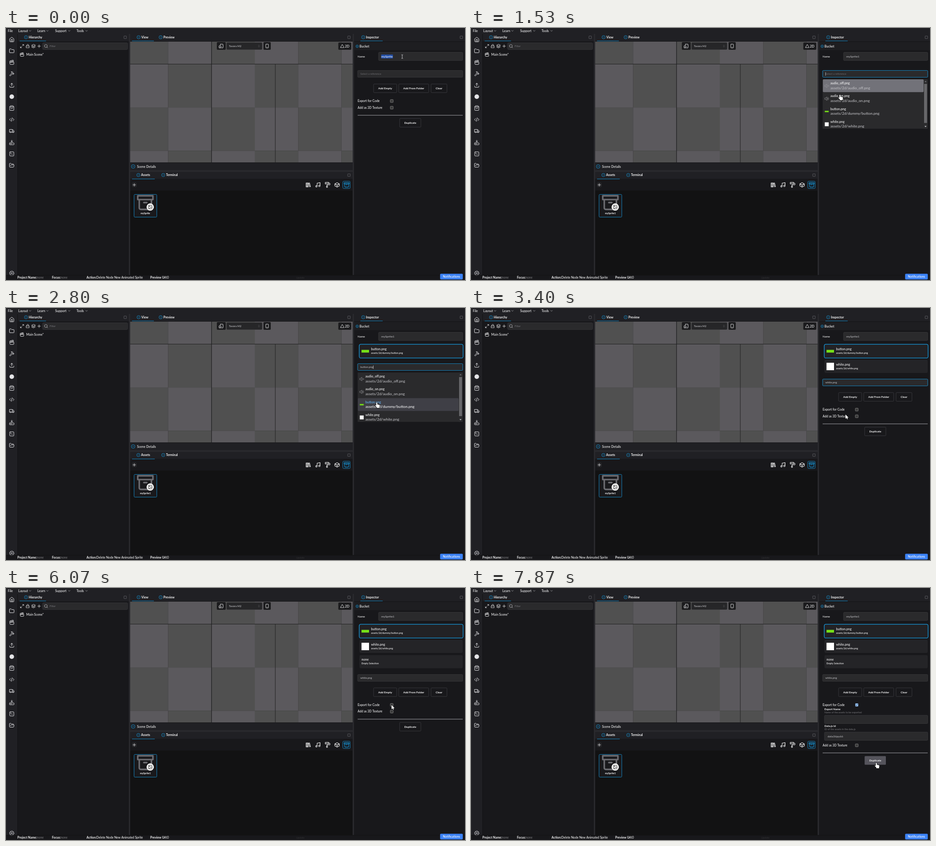
An HTML page with a canvas for the animation above (8000 ms loop, 1009 by 555 pixels).

```html
<!DOCTYPE html>
<html lang="en">
<head>
<meta charset="utf-8">
<title>Asset bucket editor</title>
<style>
  html, body { margin: 0; width: 100%; height: 100%; overflow: hidden; background: #18181b; }
  canvas { display: block; }
</style>
</head>
<body>
<canvas id="stage" width="1009" height="555"></canvas>
<script>
const ctx = document.getElementById('stage').getContext('2d');
const LOOP = 8000, BLUE = '#169be0', EDGE = '#1580b8', WHITE = '#f7f7f8';
const PANEL = '#18181b', BAR = '#202024', FIELD = '#2a2a2c', GAP = '#29292d';

// Icons live on a 24 x 24 grid.
const ring = (x, y, r) => `M${x - r} ${y}a${r} ${r} 0 1 0 ${2 * r} 0a${r} ${r} 0 1 0 ${-2 * r} 0`;
const gear = Array.from({ length: 32 }, (_, i) => {
  const a = i * Math.PI / 16, r = i % 4 < 2 ? 10.5 : 8;
  return (i ? 'L' : 'M') + (12 + r * Math.cos(a)) + ' ' + (12 + r * Math.sin(a));
}).join('') + 'z' + ring(12, 12, 3);
const SQUARE = 'M5 3h14a2 2 0 0 1 2 2v14a2 2 0 0 1-2 2H5a2 2 0 0 1-2-2V5a2 2 0 0 1 2-2z';
const SPEAKER = 'M12 3 7 8H2v8h5l5 5z';
const ICONS = {
  home: 'M3 9l9-7 9 7v11a2 2 0 0 1-2 2H5a2 2 0 0 1-2-2zM9 22V12h6v10',
  folder: 'M4 20h16a2 2 0 0 0 2-2V8a2 2 0 0 0-2-2h-8l-3-3H4a2 2 0 0 0-2 2v13a2 2 0 0 0 2 2z',
  clapper: 'M4 11h17v8a2 2 0 0 1-2 2H6a2 2 0 0 1-2-2zM4 11 3 8a2 2 0 0 1 1.5-2.4L18 2l1.5 4.5zM7.5 5l4 4M13 3.5l4 4',
  hammer: 'M15 12l-8.5 8.5a2 2 0 0 1-3-3L12 9M17.6 15 22 10.6M20.9 11.7l-3.3-3.3V6L14 3H9l4 4v2l3 3h2z',
  upload: 'M21 15v4a2 2 0 0 1-2 2H5a2 2 0 0 1-2-2v-4M7 8l5-5 5 5M12 3v12',
  bag: 'M6 2 3 6v14a2 2 0 0 0 2 2h14a2 2 0 0 0 2-2V6l-3-4zM3 6h18M16 10a4 4 0 0 1-8 0',
  code: 'M7 17l-5-5 5-5M17 7l5 5-5 5M14 4l-4 16',
  truck: 'M10 17h5V5H2v12h3M20 17h2v-5l-3-4h-4' + ring(7.5, 17, 2.5) + ring(17.5, 17, 2.5),
  drive: 'M12 2v8M16 6l-4 4-4-4M4 14h16a2 2 0 0 1 2 2v4a2 2 0 0 1-2 2H4a2 2 0 0 1-2-2v-4a2 2 0 0 1 2-2zM6 18h1M10 18h1',
  terminal: SQUARE + 'M7 11l2-2-2-2M11 13h4',
  folderOpen: 'M6 14l1.5-3A2 2 0 0 1 9.2 10H20a2 2 0 0 1 2 2.5l-1.5 6A2 2 0 0 1 18.5 20H4a2 2 0 0 1-2-2V5a2 2 0 0 1 2-2h4l3 3h7a2 2 0 0 1 2 2v2',
  gear,
  expand: 'M15 3h6v6M9 21H3v-6M21 3l-7 7M3 21l7-7',
  lock: 'M4 11h16v10H4zM7 11V7a5 5 0 0 1 10 0v4',
  layers: 'M12 2 2 7l10 5 10-5zM2 12l10 5 10-5M2 17l10 5 10-5',
  plus: 'M12 4v16M4 12h16',
  search: ring(11, 11, 8) + 'M21 21l-4.3-4.3',
  books: 'M3 4h4v16H3zM8 4h4v16H8zM13.5 5l3.5-1 4 15-3.5 1z',
  music: 'M9 18V5l12-2v13' + ring(6, 18, 3) + ring(18, 16, 3),
  roller: 'M3 2h14v6H3zM10 16v-2a2 2 0 0 1 2-2h8a2 2 0 0 0 2-2V7a2 2 0 0 0-2-2h-2M8 16h4v6H8z',
  box: 'M21 16V8l-9-5-9 5v8l9 5zM3 8l9 5 9-5M12 13v8',
  archive: 'M2 3h20v5H2zM4 8v11a2 2 0 0 0 2 2h12a2 2 0 0 0 2-2V8M10 12h4',
  image: SQUARE + ring(9, 9, 2) + 'M21 15l-4-4L6 21',
  phone: 'M7 2h10a2 2 0 0 1 2 2v16a2 2 0 0 1-2 2H7a2 2 0 0 1-2-2V4a2 2 0 0 1 2-2zM12 18h.1',
  devices: 'M9 3h10a2 2 0 0 1 2 2v14a2 2 0 0 1-2 2h-5M3 11h8v10H3zM8 7V3M7 18h.1',
  triangle: 'M12 3 2 20h20z',
  down: 'M4 8l8 8 8-8',
  updown: 'M7 9l5-5 5 5M7 15l5 5 5-5',
  audioOff: SPEAKER + 'M23 9l-6 6M17 9l6 6',
  audioOn: SPEAKER + 'M16 8.5a5 5 0 0 1 0 7M19 5a10 10 0 0 1 0 14',
  check: 'M4 12l5 6L20 6'
};
for (const name in ICONS) ICONS[name] = new Path2D(ICONS[name]);

function icon(name, cx, cy, size = 12, color = WHITE, weight = 2) {
  ctx.save();
  ctx.translate(cx - size / 2, cy - size / 2);
  ctx.scale(size / 24, size / 24);
  ctx.lineWidth = weight;
  ctx.lineCap = ctx.lineJoin = 'round';
  ctx.strokeStyle = color;
  ctx.stroke(ICONS[name]);
  ctx.restore();
}
function rect(x0, y0, x1, y1, fill) {
  ctx.fillStyle = fill;
  ctx.fillRect(x0, y0, x1 - x0, y1 - y0);
}
function rounded(x0, y0, x1, y1, radius, fill, stroke, weight = 0.8) {
  ctx.beginPath();
  ctx.roundRect(x0, y0, x1 - x0, y1 - y0, radius);
  if (fill) { ctx.fillStyle = fill; ctx.fill(); }
  if (stroke) { ctx.strokeStyle = stroke; ctx.lineWidth = weight; ctx.stroke(); }
}
function text(str, x, y, size = 7, color = WHITE, weight = 500, align = 'left') {
  ctx.font = `${weight} ${size}px Lato, sans-serif`;
  ctx.textAlign = align;
  ctx.fillStyle = color;
  ctx.fillText(str, x, y);
  return x + ctx.measureText(str).width;
}
function circle(x, y, r, fill, stroke) {
  rounded(x - r, y - r, x + r, y + r, r, fill, stroke);
}
function tab(label, x, y, underline) {
  circle(x, y, 3.6, null, BLUE);
  circle(x, y, 0.8, BLUE);
  text(label, x + 6, y + 2.6, 6.8, WHITE, 700);
  const lineY = Math.round(y + 7.7);
  if (underline) rect(underline[0], lineY, underline[1], lineY + 1, EDGE);
}
const maximize = (x, y) => rounded(x - 2.8, y - 2.8, x + 2.8, y + 2.8, 0.5, null, '#66666b');

function drawShell(renamed) {
  rect(0, 0, 1009, 555, PANEL);
  rect(0, 0, 1009, 13, BAR);
  rect(0, 13, 25, 545, BAR);
  text('File', 4, 8.6);
  [['Layout', 27, 53], ['Learn', 69, 91], ['Support', 108, 139], ['Tools', 155, 177]].forEach(([label, x, arrow]) => {
    text(label, x, 8.6, 7.1);
    icon('down', arrow, 6.3, 6);
  });
  ['home', 'folder', 'clapper', 'hammer', 'upload', '', 'bag', 'code', 'truck', 'drive', 'terminal', 'folderOpen'].forEach((name, i) => {
    const y = 25.3 + i * 25.2;
    name ? icon(name, 12.7, y, 12, '#e4e4e7') : circle(12.7, y, 5, '#e4e4e7');
  });
  icon('gear', 12.7, 540, 11.5, '#e4e4e7');

  // Hierarchy
  rect(26, 13, 270, 29, BAR);
  tab('Hierarchy', 44, 20.3, [30, 88]);
  maximize(262, 20.5);
  ['expand', 'lock', 'layers', 'plus'].forEach((name, i) => icon(name, 35.3 + i * 12.5, 40, 9.5));
  rounded(80.5, 32.5, 267.5, 47.5, 2, FIELD, '#37373a');
  icon('search', 88, 40, 9.5, '#c4c4c7');
  text('Filter', 96, 42, 5.7, '#707074');
  icon('clapper', 35, 58.5, 10.5);
  text('Main Scene*', 44.5, 61);

  // View
  rect(273, 13, 762, 29, BAR);
  tab('View', 291.5, 20.3, [277, 325]);
  tab('Preview', 340, 20.3);
  maximize(754, 20.5);
  ctx.save();
  ctx.beginPath();
  ctx.rect(273, 30, 489, 266);
  ctx.clip();
  for (let row = 0; row < 4; row++)
    for (let col = 0; col < 6; col++) {
      const x = 261 + col * 95.3, y = -15.5 + row * 95.3;
      rect(x, y, x + 95.4, y + 95.4, (row + col) % 2 ? '#5b595d' : '#505050');
    }
  rect(273, 79, 762, 80, '#202021');
  rect(451.2, 30, 452.4, 296, '#202021');
  rect(591.5, 80, 592.5, 296, '#202021');
  ctx.restore();
  rounded(463.5, 31, 483, 48, 2, '#1b1b1d');
  icon('devices', 473, 39.7, 11);
  rounded(485, 32, 563, 47.5, 2, '#262628', '#38383a');
  text('Tavora M2', 490, 41.7, 5.9, '#c4c4c7');
  icon('updown', 556, 39.8, 6.5, '#77777b');
  rounded(566, 31, 582, 48, 2, '#1b1b1d');
  icon('phone', 574, 39.7, 10);
  rounded(730.5, 32, 759, 48, 2, '#1b1b1d');
  icon('triangle', 739, 40, 9.5);
  text('2D', 745, 42.8, 7.4);
  rect(273, 297, 762, 313, BAR);
  circle(279.5, 305, 4, null, BLUE);
  ctx.beginPath();
  ctx.moveTo(277.8, 306); ctx.lineTo(279.5, 304.2); ctx.lineTo(281.2, 306);
  ctx.stroke();
  text('Scene Details', 288, 307.5);

  // Assets
  rect(273, 317, 762, 332, BAR);
  tab('Assets', 291, 323.8, [277, 327]);
  tab('Terminal', 345.7, 323.8);
  maximize(754, 324);
  rounded(277, 340.5, 287, 350.5, 2, '#27272a');
  icon('plus', 282, 345.5, 9);
  ['books', 'music', 'roller', 'box', 'archive'].forEach((name, i) =>
    icon(name, 664.5 + i * 21.1, 345.5, 13, i == 4 ? BLUE : WHITE));
  rounded(740.5, 337.5, 756.5, 353.5, 2, null, EDGE, 1);
  rect(273, 358, 762, 544, '#121213');
  rounded(281.5, 366.5, 331.5, 416.5, 2, '#19191c', EDGE, 1);
  icon('archive', 306.3, 384.5, 40, '#6c6c71', 2);
  circle(317, 394.3, 8, '#ffffff');
  icon('image', 317, 394.3, 10.5, '#18181b');
  text(renamed ? 'mySprite1' : 'mySprite', 306.3, 410, 5.2, WHITE, 700, 'center');

  // Panel gaps and status bar
  [[270, 13, 273, 545], [762, 13, 765, 545], [273, 313, 762, 317]].forEach(edges => rect(...edges, GAP));
  rect(25, 13, 26, 545, '#121213');
  rect(0, 544, 1009, 545, '#121213');
  [['Project Name:', 25, 'none', '#77777b'], ['Focus:', 101, 'none', '#77777b'],
   ['Action:', 177, 'Delete Node New Animated Sprite', WHITE], ['Preview Url:', 317, '0', WHITE]]
    .forEach(([label, x, value, color]) => text(value, text(label, x, 552, 6.8, WHITE, 700), 552, 6.7, color));
  text('Update', 638, 551.5, 5.6, '#303033');
  rounded(954.3, 541.2, 1004.2, 553.8, 2, '#3b82f6');
  text('Notifications', 979.3, 550, 6.7, '#ffffff', 500, 'center');

  // Inspector header
  rect(765, 13, 1009, 29, BAR);
  tab('Inspector', 785.3, 20.3, [779, 828]);
  maximize(1001, 20.5);
  rect(765, 31, 1009, 49, '#1e1e21');
  circle(772, 40.3, 2.8, null, BLUE);
  rect(770.8, 39.9, 773.2, 40.7, BLUE);
  text('Bucket', 777, 42.8, 7.1);
}

// Pointer path: time, x, y
const PATH = [
  [0, 871, 63], [650, 871, 63], [1070, 808, 101], [1450, 808, 101], [1530, 811, 147], [1800, 814, 184],
  [2070, 814, 184], [2330, 813.5, 128], [2580, 813.5, 128], [2800, 815, 208], [3130, 822, 237],
  [3330, 822, 237], [3800, 841.5, 196.5], [4950, 841.5, 196.5], [5250, 872, 227], [5530, 818, 251],
  [5800, 846, 258], [6070, 847.5, 257.5], [6430, 847.5, 257.5], [7200, 886, 275], [7300, 886, 275],
  [7670, 891, 385], [LOOP, 891, 385]
];
function pointerAt(t) {
  const i = PATH.findIndex(key => key[0] > t);
  const [t0, x0, y0] = PATH[i - 1], [t1, x1, y1] = PATH[i];
  const u = (t - t0) / (t1 - t0), k = u * u * (3 - 2 * u);
  return { x: x0 + (x1 - x0) * k, y: y0 + (y1 - y0) * k, kind: 'arrow' };
}
function over(p, x0, y0, x1, y1, kind) {
  const inside = p.x >= x0 && p.x <= x1 && p.y >= y0 && p.y <= y1;
  if (inside) p.kind = kind;
  return inside;
}

const ARROW = new Path2D('M0 0V9.4L2.2 7.4L3.7 10.6L5.2 9.9L3.8 6.9H6.8z');
const HAND = new Path2D('M-1.1 1.1Q-1 0 0 0Q1 0 1.1 1.1V4.2L5.5 5.2Q6.9 5.6 6.7 7L6 10.2V12H0V10.6L-3.2 7Q-3.6 5.8-2.4 5.8L-1.1 6.9z');
const BEAM = new Path2D('M-1.8-4.2Q0-4.2 0-3.2V3.2Q0 4.2-1.8 4.2M1.8-4.2Q0-4.2 0-3.2M0 3.2Q0 4.2 1.8 4.2');
function drawPointer({ x, y, kind }) {
  ctx.save();
  ctx.translate(x, y);
  if (kind == 'text') {
    ctx.strokeStyle = '#d4d4d8';
    ctx.lineWidth = 0.9;
    ctx.stroke(BEAM);
  } else {
    const shape = kind == 'hand' ? HAND : ARROW;
    ctx.lineWidth = 1.3;
    ctx.strokeStyle = '#111';
    ctx.fillStyle = '#fff';
    ctx.stroke(shape);
    ctx.fill(shape);
  }
  ctx.restore();
}

function field(p, x0, y0, x1, y1, focus = 0) {
  over(p, x0, y0, x1, y1, 'text');
  rounded(x0, y0, x1, y1, 1.5, FIELD, '#3a3a3d');
  ctx.globalAlpha = focus;
  if (focus) rounded(x0, y0, x1, y1, 1.5, null, EDGE, 1);
  ctx.globalAlpha = 1;
}
function button(p, label, x0, x1, y, pressed) {
  const hover = over(p, x0, y, x1, y + 19, 'hand');
  rounded(x0, y, x1, y + 19, 1.5, hover ? (pressed ? '#55545c' : '#3f3f46') : PANEL, hover ? null : '#414146');
  text(label, (x0 + x1) / 2, y + 11.8, 6.2, WHITE, 700, 'center');
}
function checkbox(y, checked) {
  rounded(844.8, y - 3.2, 851.2, y + 3.2, 1, checked ? '#99c8ff' : '#3b3b3b', checked ? null : '#858585');
  if (checked) icon('check', 848, y, 5.5, '#1c2b3f', 4);
}
function card(i, name, detail, thumb) {
  const y = 80 + i * 33.6, x = thumb ? 802.5 : 781.5;
  if (i) rounded(777, y + 0.5, 1004, y + 29.5, 3, '#242427');
  else rounded(776.5, y - 0.2, 1004.8, y + 30.2, 3.5, '#222225', BLUE, 1.3);
  if (thumb) rect(781.5, y + 15.2 - thumb.half, 798, y + 15.2 + thumb.half, thumb.color);
  text(name, x, y + 13, 7.1);
  text(detail, x, y + 21, 5.3);
}

const FILES = [
  ['audio_off.png', 'assets/2d/audio_off.png'], ['audio_on.png', 'assets/2d/audio_on.png'],
  ['button.png', 'assets/2d/dummy/button.png'], ['white.png', 'assets/2d/white.png']
];
const GREEN = '#76e018';
function dropdown(p, top, firstActive) {
  const bottom = top + 108.7;
  rect(773, top, 1004, bottom, FIELD);
  ctx.save();
  ctx.beginPath();
  ctx.rect(773, top, 231, 108.7);
  ctx.clip();
  FILES.forEach(([name, path], i) => {
    const y = top + i * 28.2;
    const inside = over(p, 773, y, 995, Math.min(y + 28.2, bottom), 'hand');
    const hover = inside && !firstActive, active = firstActive && i == 0;
    if (hover || active) rounded(773.5, y, 995, y + 28.2, 2, active ? '#727279' : '#3f3f46');
    if (i < 2) icon(i ? 'audioOn' : 'audioOff', 782, y + 14.4, 10, '#98989c', 1.8);
    else if (i == 2) rect(777.7, y + 12.9, 786.3, y + 15.9, GREEN);
    else rect(777.7, y + 10, 786.3, y + 18.6, '#fff');
    text(name, 790, y + 11, 7.15, hover ? '#63b3f4' : WHITE);
    text(path, 790, y + 21.5, 8.2, hover ? WHITE : '#bdbdc1');
  });
  ctx.restore();
  rect(995, top, 1003.5, bottom, '#2c2c2e');
  rect(996, top + 10, 1002.5, top + 96, '#67676a');
  [[top + 5, -1, '#77777b'], [bottom - 5, 1, '#d0d0d3']].forEach(([y, dir, color]) => {
    ctx.fillStyle = color;
    ctx.beginPath();
    ctx.moveTo(997, y - dir); ctx.lineTo(1001.4, y - dir); ctx.lineTo(999.2, y + 1.5 * dir);
    ctx.fill();
  });
}

function drawInspector(t, p) {
  const cards = t < 2060 ? 0 : t < 3330 ? 1 : t < 4530 ? 2 : 3;
  const exported = t >= 6130;
  const shift = cards ? 29.3 + (cards - 1) * 33.7 : 0;

  const selected = t < 500, typed = t >= 600;
  text('Name', 773, 65, 6.2);
  field(p, 819, 53.5, 1004, 71.5, t < 1100 ? Math.min(1, Math.max(0, (t - 10) / 120)) : 0);
  if (selected) rect(824.8, 58.5, 850.5, 67, '#2450a8');
  const nameEnd = text(typed ? 'mySprite1' : 'mySprite', 825, 65.2, 6.4, selected ? WHITE : '#b9b9bd');
  if (!selected && t < 1100) rect(nameEnd + 0.4, 59, nameEnd + 1, 67, WHITE);

  if (cards > 0) card(0, 'button.png', 'assets/2d/dummy/button.png', { half: 3, color: GREEN });
  if (cards > 1) card(1, 'white.png', 'assets/2d/white.png', { half: 8.2, color: '#fff' });
  if (cards > 2) card(2, 'none', 'Empty Selection');

  const focus = t < 1100 ? 0 : t < 4470 ? 1 : Math.max(0, 0.6 * (1 - (t - 4470) / 130));
  const open = (t >= 1180 && t < 2060) || (t >= 2600 && t < 3330);
  const value = ['', 'button.png', 'white.png', 'white.png'][cards];
  const inputY = Math.round(93 + shift) + 0.5;
  field(p, 773, inputY, 1004, inputY + 15, focus);
  const valueEnd = text(value, 779, inputY + 9.3, 5.85, '#b9b9bd');
  if (!value) text('Select a reference', 779, inputY + 9.3, 5.85, '#66666a');
  if (open) rect(valueEnd + 0.2, inputY + 4, valueEnd + 0.8, inputY + 11.5, WHITE);

  const rowY = 123.3 + shift;
  button(p, 'Add Empty', 808, 859, rowY, t >= 4470);
  button(p, 'Add From Folder', 863.3, 929.3, rowY);
  button(p, 'Clear', 934.3, 969.3, rowY);

  text('Export for Code', 773, 163 + shift, 6.9);
  checkbox(160.8 + shift, exported);
  if (exported) {
    text('Export Name', 777, 268.6, 6, WHITE, 700);
    text('Name of the assets to be exported', 777, 275.7, 5.4, '#707074');
    field(p, 777, 280.3, 1004, 298.5);
    text('Data.js Id', 777, 305.7, 6, WHITE, 700);
    text('ID of the assets in the data.js', 777, 312.6, 5.4, '#707074');
    field(p, 777, 317.3, 1004, 335.5);
    text('data36py66', 784, 328.7, 6.4, '#b9b9bd');
  }
  const end = shift + (exported ? 74.3 : 0);
  text('Add as 3D Texture', 773, 177.7 + end, 6.7);
  checkbox(175.5 + end);
  rect(773, 191.7 + end, 1004, 192.6 + end, '#b4b4b8');
  button(p, 'Duplicate', 865.3, 912, 199.3 + end, t >= 7870);

  if (open) {
    over(p, 773, inputY + 19.5, 1004, inputY + 129, 'arrow');
    dropdown(p, inputY + 19.6, t >= 1470 && t < 1570);
  }
}

function frame() {
  const t = performance.now() % LOOP;
  const pointer = pointerAt(t);
  drawShell(t >= 600);
  drawInspector(t, pointer);
  drawPointer(pointer);
  requestAnimationFrame(frame);
}
frame();
</script>
</body>
</html>
```
